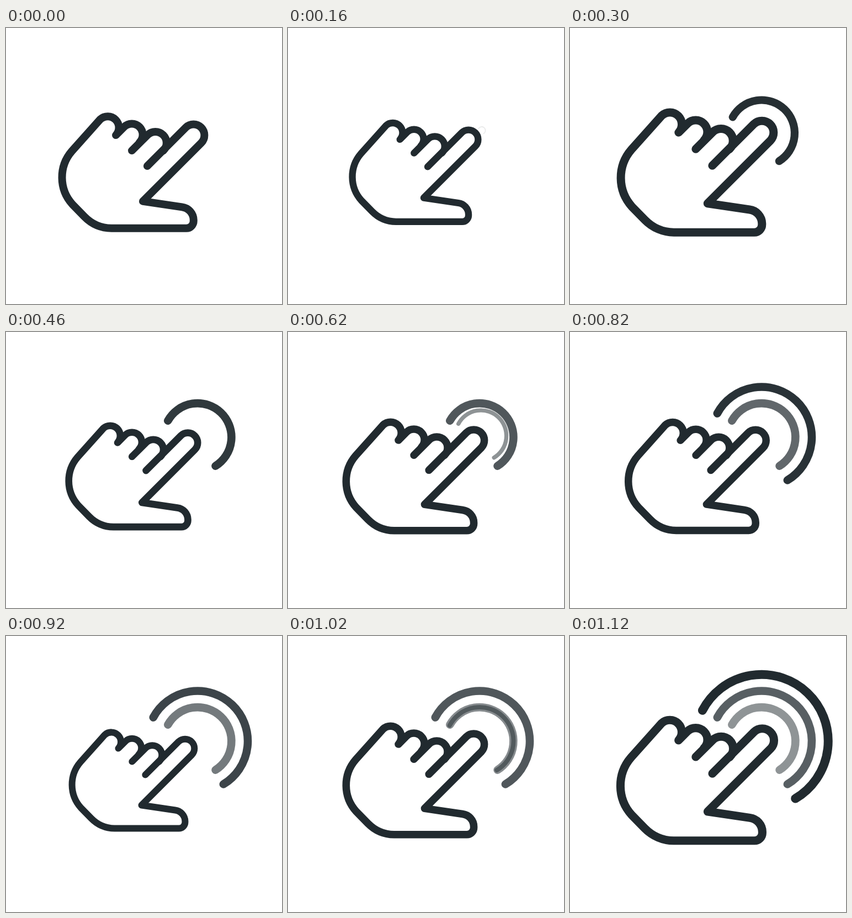
An HTML page for the animation above (1140 ms loop, 500 px wide and 500 px high).

```html
<!DOCTYPE html>
<html lang="en">
<head>
<meta charset="utf-8">
<title>Tap gesture</title>
<style>
  html, body { margin: 0; width: 100%; height: 100%; overflow: hidden; background: #fff; }
  svg { display: block; width: 100%; height: 100%; }
</style>
</head>
<body>
<svg viewBox="0 0 500 500" fill="none" stroke="#212a2f" stroke-width="14" stroke-linecap="round" stroke-linejoin="round">
  <g id="rings"></g>
  <g id="hand">
    <path d="M256 250 L326 180 A19.8 19.8 0 0 1 354 208 L248 314 L319 324.5
      A24 24 0 0 1 340 348 V350 A13 13 0 0 1 327 363 H191 A70 70 0 0 1 142 342
      L120 319.5 A73 73 0 0 1 119 223 L170.4 165.5 A20.2 20.2 0 0 1 199 194
      L214 179 A19.8 19.8 0 0 1 242 207"/>
    <path d="M228 222 L256.4 193.7 A20.2 20.2 0 0 1 285 222.3"/>
  </g>
</svg>
<script>
const LOOP = 1140, TAP = 400, PRESS = 120, RELEASE = 320;
const CX = 347, CY = 190.5;

// r: radius, w: line width, a/b: end angles in degrees, ox/oy: point the ring grows from
const rings = [
  { r: 61.4, w: 14.6, a: 209, b: 58, ox: 351.5, oy: 185 },
  { r: 91, w: 14.6, a: 208.2, b: 59, ox: 352, oy: 185.5 },
  { r: 120.7, w: 16, a: 207.5, b: 59.5, ox: 347.5, oy: 190 }
];

const hand = document.getElementById('hand');
const group = document.getElementById('rings');

function polar(r, deg) {
  const q = deg * Math.PI / 180;
  return `${CX + r * Math.cos(q)} ${CY + r * Math.sin(q)}`;
}

for (const ring of rings) {
  ring.el = document.createElementNS('http://www.w3.org/2000/svg', 'path');
  ring.el.setAttribute('d', `M${polar(ring.r, ring.a)} A${ring.r} ${ring.r} 0 1 1 ${polar(ring.r, ring.b)}`);
  ring.el.setAttribute('stroke-width', ring.w);
  group.append(ring.el);
}

// Smooth step from 0 to 1 between two times
function ease(t, from, to) {
  const p = Math.min(1, Math.max(0, (t - from) / (to - from)));
  return p * p * (3 - 2 * p);
}

function scaleAt(el, s, x, y) {
  el.setAttribute('transform', `translate(${x} ${y}) scale(${s}) translate(${-x} ${-y})`);
}

function draw(t) {
  // Shrinks for half a tap, then grows back
  const phase = (t - PRESS + TAP) % TAP;
  const open = ease(Math.min(phase, TAP - phase), 0, TAP / 2);
  scaleAt(hand, 0.858 + 0.2185 * open, 230.5, 261);

  rings.forEach((ring, i) => {
    const start = PRESS + i * TAP, full = RELEASE + i * TAP;
    const grow = ease(t, start, full);
    const fade = ease(t, full, full + TAP) + ease(t, full + TAP, full + 2 * TAP);
    ring.el.setAttribute('visibility', grow > 0 ? 'visible' : 'hidden');
    ring.el.setAttribute('opacity', grow - 0.25 * fade);
    scaleAt(ring.el, grow, ring.ox, ring.oy);
  });
}

const begin = performance.now();
function tick() {
  draw((performance.now() - begin) % LOOP);
  requestAnimationFrame(tick);
}
draw(0);
requestAnimationFrame(tick);
</script>
</body>
</html>
```
